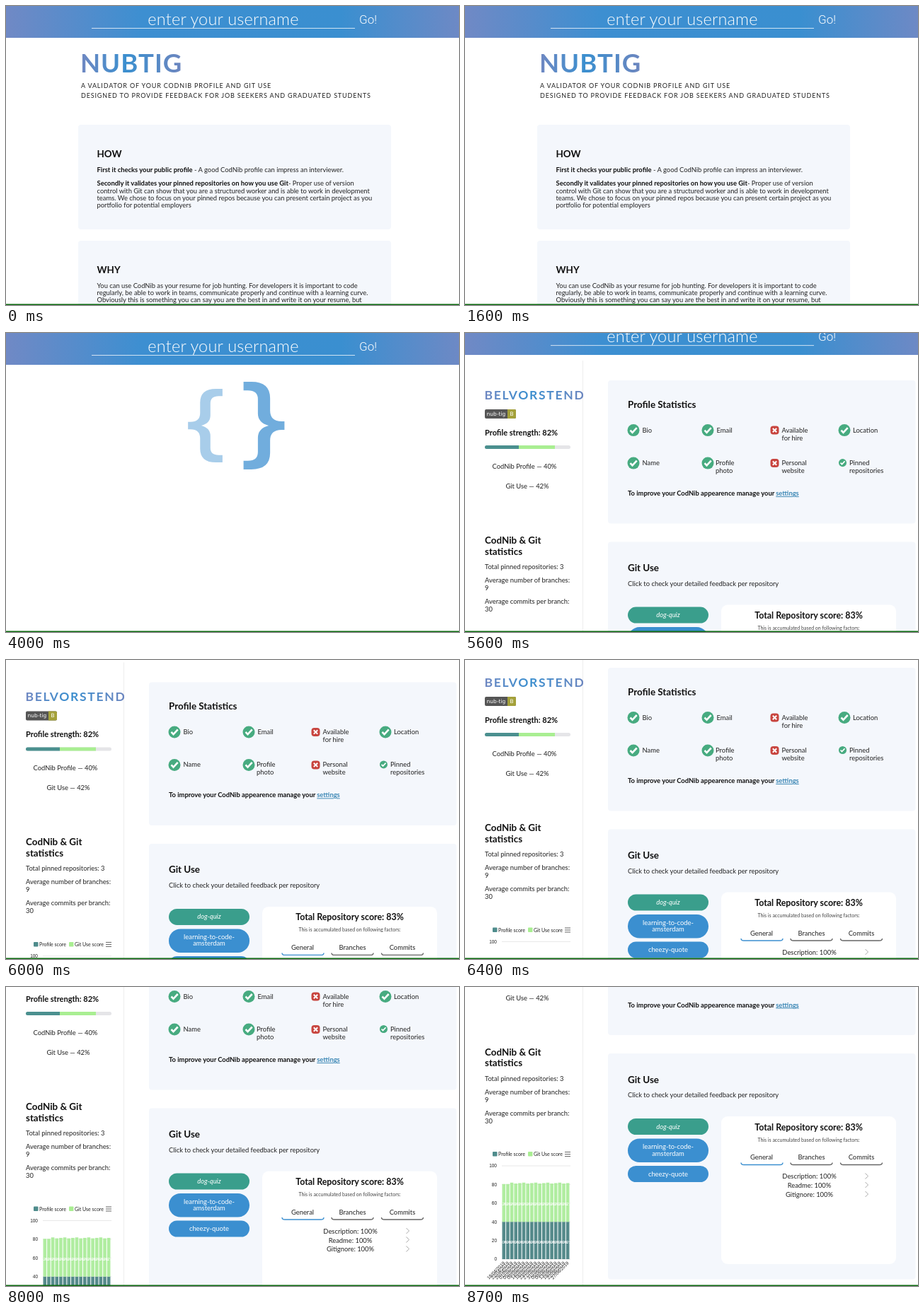
An HTML page that plays this animation: 640 px wide and 423 px high, repeating every 8800 ms.

```html
<!DOCTYPE html>
<html lang="en">
<head>
<meta charset="utf-8">
<title>Profile validator</title>
<style>
  html, body { margin: 0; width: 100%; height: 100%; overflow: hidden; background: #fff }
  svg { display: block; width: 100vw; height: 100vh; font: 9.4px Lato, "Open Sans", sans-serif; fill: #222 }
  text { white-space: pre }
  .b { font-weight: 700; fill: #111 }
  .h { font-weight: 700; font-size: 13.4px; fill: #111 }
  .m { text-anchor: middle }
  .w { fill: #fff }
  .card { fill: #f4f7fc }
  .caps { font-size: 9px; letter-spacing: .84px }
  .axis { font: 6.5px "Liberation Sans", sans-serif; text-anchor: end }
  .line { fill: none; stroke: #666; stroke-width: 1 }
</style>
</head>
<body>
<svg viewBox="0 0 640 423" preserveAspectRatio="none">
  <defs>
    <linearGradient id="bar" x2="640" gradientUnits="userSpaceOnUse">
      <stop stop-color="#7089c5"/><stop offset=".3" stop-color="#3d8fd1"/>
      <stop offset=".74" stop-color="#3a8fd0"/><stop offset="1" stop-color="#6d89c5"/>
    </linearGradient>
    <linearGradient id="ink">
      <stop stop-color="#7088c2"/><stop offset=".45" stop-color="#3b8fcf"/><stop offset="1" stop-color="#6d86bf"/>
    </linearGradient>
    <clipPath id="side"><path d="M0 0H167V900H0z"/></clipPath>
    <path id="brace" d="M28.5-61H17.5Q-8.5-61-8.5-38V-21Q-8.5-6-24.5-6H-28.5V6H-24.5Q-8.5 6-8.5 21V38Q-8.5 61 17.5 61H28.5V49H22.5Q8.5 49 8.5 37V17Q8.5 4-6.5 0Q8.5-4 8.5-17V-37Q8.5-49 22.5-49H28.5z"/>
    <g id="yes"><circle r="8.5" fill="#47ab80"/><path d="M-4.5 0L-1.5 3.2L4.7-3.5" fill="none" stroke="#fff" stroke-width="2.6"/></g>
    <g id="no"><rect x="-6" y="-6" width="12" height="12" rx="4" fill="#c8453f"/><path d="M-2.7-2.7L2.7 2.7M2.7-2.7L-2.7 2.7" stroke="#fff" stroke-width="2"/></g>
    <path id="tab" d="M-29.5-3Q-29.5 0-25.5 0H25.5Q29.5 0 29.5-3" fill="none" stroke-width="1.4"/>
    <path id="next" d="M-2-4L2 0L-2 4" fill="none" stroke="#aaa"/>
  </defs>

  <g id="page">
    <path d="M0 0H640V45H0z" fill="url(#bar)"/>
    <path d="M121 31.5H493" stroke="#fff" stroke-opacity=".75"/>
    <text class="w m" x="307" y="26.5" font-size="23.5" font-weight="300" letter-spacing=".2">enter your username</text>
    <text class="w" x="499" y="25" style="font:300 17px Roboto,sans-serif">Go!</text>

    <g id="hero">
      <text x="105" y="93.5" font-size="36.5" font-weight="700" letter-spacing="1" fill="url(#ink)">NUBTIG</text>
      <g class="caps">
        <text x="106" y="116">A VALIDATOR OF YOUR CODNIB PROFILE AND GIT USE</text>
        <text x="106" y="130">DESIGNED TO PROVIDE FEEDBACK FOR JOB SEEKERS AND GRADUATED STUDENTS</text>
      </g>
      <rect class="card" x="102" y="168" width="442" height="148" rx="4"/>
      <rect class="card" x="102" y="332" width="442" height="120" rx="4"/>
      <text class="h" x="128.5" y="214">HOW</text>
      <text x="128.5" y="234.5"><tspan class="b">First it checks your public profile</tspan> - A good CodNib profile can impress an interviewer.</text>
      <text x="128.5" y="254"><tspan class="b">Secondly it validates your pinned repositories on how you use Git</tspan>- Proper use of version</text>
      <text x="128.5" y="264.5">control with Git can show that you are a structured worker and is able to work in development</text>
      <text x="128.5" y="275">teams. We chose to focus on your pinned repos because you can present certain project as you</text>
      <text x="128.5" y="285">portfolio for potential employers</text>
      <text class="h" x="128.5" y="377.5">WHY</text>
      <text x="128.5" y="398.5">You can use CodNib as your resume for job hunting. For developers it is important to code</text>
      <text x="128.5" y="409">regularly, be able to work in teams, communicate properly and continue with a learning curve.</text>
      <text x="128.5" y="419">Obviously this is something you can say you are the best in and write it on your resume, but</text>
    </g>

    <g id="loader" fill="#3c8fd0"><use href="#brace"/><use href="#brace"/></g>

    <g id="result">
      <path d="M166.5 53V700" stroke="#eee"/>
      <g clip-path="url(#side)">
        <text x="27.5" y="107.5" font-size="17.5" font-weight="700" letter-spacing="1.7" fill="url(#ink)">BELVORSTEND</text>
      </g>
      <rect x="28" y="122" width="44" height="13" rx="2" fill="#555"/>
      <path d="M60 122H70Q72 122 72 124V133Q72 135 70 135H60z" fill="#a4a13a"/>
      <g class="w m" style="font:7.5px 'DejaVu Sans',sans-serif"><text x="44" y="131">nub-tig</text><text x="66" y="131">B</text></g>
      <text class="b" x="28" y="159" font-size="11">Profile strength: 82%</text>
      <rect x="28" y="173" width="121" height="5" rx="2.5" fill="#e5e5e8"/>
      <path d="M76 173H127V178H76z" fill="#a9ee92"/>
      <path d="M76 173H30.5a2.5 2.5 0 0 0 0 5H76z" fill="#4b908f"/>
      <text class="m" x="84" y="206">CodNib Profile — 40%</text>
      <text class="m" x="88" y="234">Git Use — 42%</text>
      <text class="h" x="28" y="312">CodNib &amp; Git</text>
      <text class="h" x="28" y="327.5">statistics</text>
      <text x="28" y="348">Total pinned repositories: 3</text>
      <text x="28" y="367">Average number of branches:</text>
      <text x="28" y="378">9</text>
      <text x="28" y="397">Average commits per branch:</text>
      <text x="28" y="408">30</text>
      <g id="chart" transform="translate(0 215.5)">
        <rect x="39" y="233" width="6.5" height="6.5" rx="1" fill="#4f8c8c"/>
        <rect x="89" y="233" width="6.5" height="6.5" rx="1" fill="#a9ee92"/>
        <g font-size="7"><text x="47" y="239">Profile score</text><text x="97" y="239">Git Use score</text></g>
        <path class="line" d="M141 233.5H149M141 236.5H149M141 239.5H149"/>
      </g>

      <rect class="card" x="202" y="81" width="434.5" height="202.5" rx="4"/>
      <text class="h" x="230" y="120">Profile Statistics</text>
      <use href="#yes" x="238" y="151.5"/><text x="250.5" y="155">Bio</text>
      <use href="#yes" x="343" y="151.5"/><text x="355.5" y="155">Email</text>
      <use href="#no" x="437.5" y="151.5"/><text x="447.5" y="155">Available</text><text x="447.5" y="165.5">for hire</text>
      <use href="#yes" x="536" y="151.5"/><text x="548" y="155">Location</text>
      <use href="#yes" x="238" y="198"/><text x="250.5" y="201">Name</text>
      <use href="#yes" x="343" y="198"/><text x="354" y="201">Profile</text><text x="354" y="212">photo</text>
      <use href="#no" x="437.5" y="198"/><text x="447.5" y="201">Personal</text><text x="447.5" y="212">website</text>
      <use href="#yes" transform="translate(533.5 197.5) scale(.65)"/><text x="543" y="201">Pinned</text><text x="543" y="212">repositories</text>
      <text class="b" x="230" y="244">To improve your CodNib appearence manage your <tspan fill="#3a86b4" text-decoration="underline">settings</tspan></text>

      <rect class="card" x="202" y="309.5" width="434.5" height="319.5" rx="4"/>
      <text class="h" x="230" y="351">Git Use</text>
      <text x="230" y="371.5">Click to check your detailed feedback per repository</text>
      <rect x="230" y="401.5" width="114" height="23" rx="11.5" fill="#3a9e8c"/>
      <rect x="230" y="430" width="114" height="33.5" rx="16.5" fill="#3b8fd0"/>
      <rect x="230" y="468.5" width="114" height="23" rx="11.5" fill="#3b8fd0"/>
      <g class="w m">
        <text x="287" y="416" font-style="italic">dog-quiz</text>
        <text x="287" y="444.5">learning-to-code-</text><text x="287" y="454">amsterdam</text>
        <text x="287" y="483">cheezy-quote</text>
      </g>
      <rect class="w" x="362" y="398.5" width="247" height="209" rx="9"/>
      <g class="m">
        <text class="b" x="485.5" y="418" font-size="12.4">Total Repository score: 83%</text>
        <text x="485.5" y="434" font-size="7" fill="#444">This is accumulated based on following factors:</text>
        <text x="419" y="459.5">General</text><text x="489.5" y="459.5">Branches</text><text x="560" y="459.5">Commits</text>
        <text x="486.5" y="486.5">Description: 100%</text>
        <text x="486.5" y="499.5">Readme: 100%</text>
        <text x="486.5" y="512">Gitignore: 100%</text>
      </g>
      <use href="#tab" x="419.5" y="467" stroke="#3b8fd0"/>
      <use href="#tab" x="489.5" y="467" stroke="#666"/>
      <use href="#tab" x="560" y="467" stroke="#666"/>
      <use href="#next" x="567.5" y="483"/><use href="#next" x="567.5" y="495.5"/><use href="#next" x="567.5" y="508.5"/>
    </g>
  </g>
  <path d="M0 421.5H640V423H0z" fill="#0c6a10"/>
</svg>
<script>
const $ = id => document.getElementById(id);

function chart() {
  const base = 385, unit = 1.32, count = 17, pitch = 96 / count;
  const teal = 40 * unit;
  let out = '', labels = '';
  for (let v = 0; v <= 100; v += 20) {
    const y = base - v * unit;
    out += `<path d="M52 ${y}H149" stroke="#e8e8e8"/><text class="axis" x="45" y="${y + 2.3}">${v}</text>`;
  }
  for (let i = 0; i < count; i++) {
    const x = 52.5 + i * pitch, mid = x + 2.3;
    const green = (i < 2 ? 40.5 : 41 + i * 7 % 3 / 2) * unit;
    const day = 18 + i * 70 / (count - 1);
    const date = new Date(2019, 3, day).toLocaleDateString('en-GB');
    out += `<path d="M${x} ${base}v${-teal}h4.6v${teal}z" fill="#558a8b"/>
      <path d="M${x} ${base - teal}v${-green}h4.6v${green}z" fill="#b0eda0"/>`;
    labels += `<g class="w m" font-size="6"><text x="${mid}" y="363">40%</text><text x="${mid}" y="309">42%</text></g>
      <text class="axis" transform="translate(${mid + 2} 391) rotate(-45)">${date}</text>`;
  }
  $('chart').innerHTML += out + labels;
}

const ease = (t, from, to) => {
  const p = Math.min(1, Math.max(0, (t - from) / (to - from)));
  return p * p * (3 - 2 * p);
};

function draw(now) {
  const t = Math.floor(now % 8800 / 100) * 100;
  const show = (id, on) => $(id).style.display = on ? '' : 'none';
  show('hero', t < 2200);
  show('loader', t >= 2200 && t < 4200);
  show('result', t >= 4200);

  const wave = Math.cos((t - 2930) / 1000 * Math.PI);
  [...$('loader').children].forEach((brace, i) => {
    const side = i ? -1 : 1, w = wave * side, s = (57 + 5 * w) / 61;
    brace.setAttribute('transform', `translate(${i ? 364.5 : 281.5} 131) scale(${s * side} ${s})`);
    brace.setAttribute('opacity', .585 + .145 * w);
  });

  const scroll = 70 * ease(t, 5280, 6400) + 68 * ease(t, 7000, 8000) + 77.5 * ease(t, 8000, 8700);
  $('page').setAttribute('transform', `translate(0 ${-scroll})`);
  requestAnimationFrame(draw);
}

chart();
requestAnimationFrame(draw);
</script>
</body>
</html>
```
